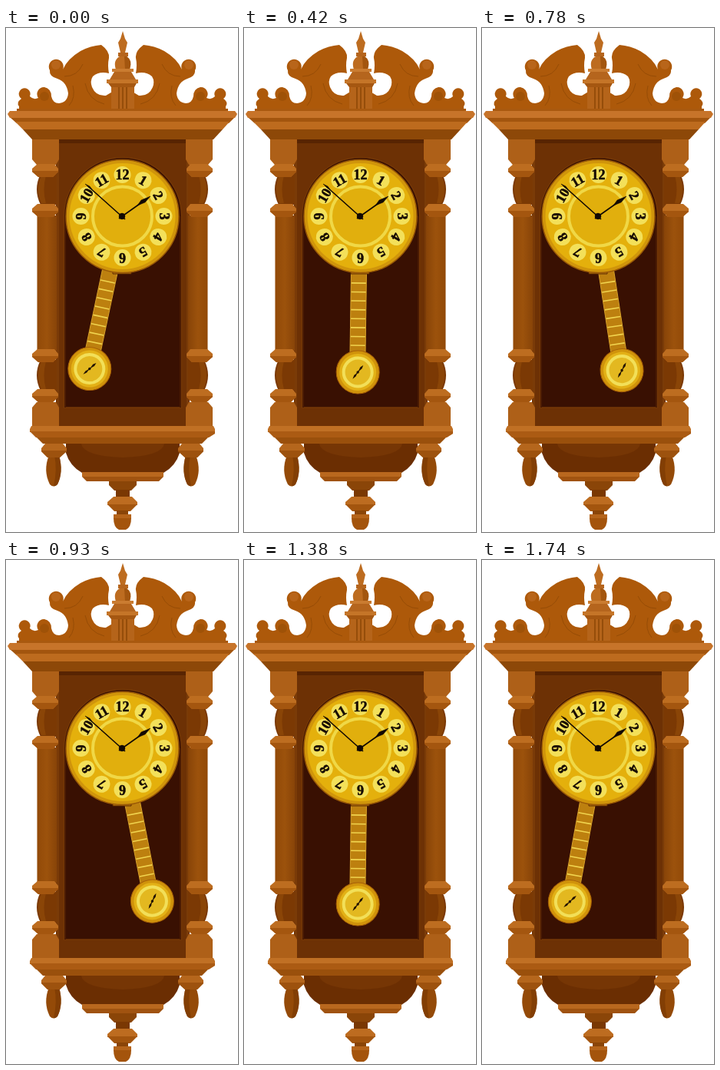
Animation, 302 px wide and 656 px high, one loop 1770 ms. Source, as an HTML page:

```html
<!DOCTYPE html>
<html lang="en">
<head>
<meta charset="utf-8">
<title>Pendulum clock</title>
<style>
  html, body { margin: 0; width: 100%; height: 100%; overflow: hidden; background: #fff; }
  svg { display: block; width: 302px; height: 656px; }
  text {
    font: bold 18px "Liberation Serif", "Noto Serif", serif;
    text-anchor: middle; fill: #160b02; stroke: #160b02; stroke-width: .5;
  }
</style>
</head>
<body>
<svg viewBox="0 0 302 656">
  <defs>
    <linearGradient id="shaft">
      <stop offset="0" stop-color="#924a08"/>
      <stop offset=".5" stop-color="#9c520c"/>
      <stop offset="1" stop-color="#884408"/>
    </linearGradient>
    <g id="collar">
      <path fill="#bd6d20" d="M41 0H63L68 6V10L61 17H42L34 10V6Z"/>
      <path fill="#a4560f" d="M34 9H68V10L61 17H42L34 10Z"/>
    </g>
    <g id="spindle">
      <path fill="#7b3904" d="M45 0H66V40H45Q35 20 45 0Z"/>
      <path fill="#8a4507" d="M46 2H52Q47 20 52 38H46Q38 20 46 2Z"/>
    </g>
    <path id="block" fill="#ae6018" d="M34 0H69V26L65 33H40L34 26Z"/>
    <g id="side">
      <!-- swan-neck scroll -->
      <path fill="#ad590a" d="M17 108V102Q13 97 20 92A7.500 7.500 0 1 1 31 89Q36 94 42 91
        A9 9 0 0 1 50 77Q59 79 59 89Q61 98 69 98Q80 97 81 85Q79 70 67 66Q56 63 57 55
        A9.500 9.500 0 1 1 74 54Q80 40 97 30Q110 23 124 22Q135 30 134 39Q132 48 134 59
        Q121 56 113 63Q109 69 112 77Q117 89 130 88L140 82V108Z"/>
      <path fill="none" stroke="#964c06" d="M76 63Q93 63 100 47M87 75Q91 91 82 101M103 72Q107 94 128 99"/>
      <circle cx="65" cy="48" r="6" fill="#b8651a"/>
      <circle cx="50" cy="89" r="6" fill="#9f5207"/>
      <!-- column -->
      <use href="#spindle" y="190"/>
      <use href="#spindle" y="432"/>
      <path fill="url(#shaft)" d="M40.500 244H66V420H40.500Z"/>
      <use href="#block" y="145"/>
      <use href="#block" transform="matrix(1 0 0 -1 0 520)"/>
      <use href="#collar" y="177"/>
      <use href="#collar" y="229"/>
      <use href="#collar" y="418"/>
      <use href="#collar" y="470"/>
      <!-- hanging drop -->
      <path fill="#944a08" d="M56 556H69Q75 578 67 594Q62 599 57 594Q48 576 56 556Z"/>
      <path fill="#823e04" d="M63 556H69Q75 578 67 594Q64 597 62 596Q67 575 63 556Z"/>
      <path fill="#b5661c" d="M51 541H74L79 547V551L70 559H54L46 551V547Z"/>
      <path fill="#9d520e" d="M46 550H79V551L70 559H54L46 551Z"/>
    </g>
  </defs>

  <!-- cabinet -->
  <path fill="#6d3105" d="M65 145H239V519H65Z"/>
  <path fill="#582402" d="M66 145H238V150H66Z"/>
  <path fill="#7a3b08" d="M66 150H69V519H66ZM235 150H238V519H235Z"/>
  <path fill="#391002" stroke="#753807" stroke-width="1.500" d="M75.500 494V245A76 76 0 0 1 228.500 245V494Z"/>
  <path fill="#4b1b03" d="M76 245H78V494H76ZM226 245H228V494H226Z"/>

  <!-- bowl -->
  <path fill="#6b2e02" d="M78 541H226V553Q221 570 205 579H99Q83 570 78 553Z"/>
  <path fill="#763605" d="M98 541H206Q204 557 152 559Q100 557 98 541Z"/>

  <use href="#side"/>
  <use href="#side" transform="matrix(-1 0 0 1 303 0)"/>

  <!-- centre finial -->
  <path fill="#bd6c20" d="M152 4L155 14L158 19L155 32H149L146 19L149 14Z"/>
  <path fill="#b5651d" d="M146 32H159V37H146Z"/>
  <path fill="#bd6c20" d="M148 37H157Q165 42 161 54H143Q139 42 148 37Z"/>
  <path fill="#a3560f" d="M154 37H157Q165 42 161 54H155Z"/>
  <path fill="#ca7c31" d="M138 53H166V57H138Z"/>
  <path fill="#b5651d" d="M141 57H163L169 67H135Z"/>
  <path fill="#c57528" d="M131 67H172V72H131Z"/>
  <path fill="#a55711" d="M133 72H170L167 77H137Z"/>
  <path fill="#b5641a" d="M137 77H167V108H137Z"/>
  <path stroke="#8b4506" stroke-width="1.500" d="M147 77V106M152 77V106M157 77V106"/>

  <!-- cornice -->
  <path fill="#a9590f" d="M14 105H289V109H14Z"/>
  <path fill="#c7742a" d="M5 108H298L301 112L298 117H5L2 112Z"/>
  <path fill="#a3550e" d="M6 117H297L290 124H14Z"/>
  <path fill="#bd6b1e" d="M12 122H291L282 132H22Z"/>
  <path fill="#8d4808" d="M22 132H282L270 145H34Z"/>

  <!-- base -->
  <path fill="#c07024" d="M33 518H270L272 522V526H31V522Z"/>
  <path fill="#ab5b13" d="M31 525H272V528L264 533H39Z"/>
  <path fill="#9a500c" d="M40 533H263L255 541H48Z"/>
  <path fill="#b9681e" d="M99 578H205V584H99Z"/>
  <path fill="#a05310" d="M99 584H205L199 590H105Z"/>
  <path fill="#8a4508" d="M134 590H170V595L163 602H141L134 595Z"/>
  <path fill="#7a3803" d="M143 601H161V612H143Z"/>
  <path fill="#bd6c20" d="M140 610H164L171 617V621H132V617Z"/>
  <path fill="#a3550e" d="M132 620H171L162 629H141Z"/>
  <path fill="#8a4508" d="M144 628H159V636H144Z"/>
  <path fill="#b5641a" d="M140 633H163V639H140Z"/>
  <path fill="#a4540c" d="M140 638H163Q163 650 156 653H147Q140 650 140 638Z"/>

  <g id="pendulum">
    <path fill="#bd800f" stroke="#d6a02a" d="M140.500 300H160.500V424H140.500Z"/>
    <path id="bars" stroke="#f0d34e" stroke-width="1.600"/>
    <circle cx="151" cy="448" r="28" fill="#d0930b" stroke="#a75f08"/>
    <circle cx="151" cy="448" r="24" fill="#e3b116"/>
    <circle cx="151" cy="448" r="18.500" fill="#e3b820" stroke="#f2df58" stroke-width="4"/>
    <g transform="rotate(37 151 448)" fill="#231303">
      <path d="M151 436.500L152.500 441L151.600 445V451L152.400 454L151 459L149.600 454L150.400 451V445L149.500 441Z"/>
      <circle cx="151" cy="448" r="1.700"/>
    </g>
  </g>

  <!-- dial -->
  <path fill="#b8780b" stroke="#5a2903" d="M139 314H163V320H139Z"/>
  <circle cx="151.500" cy="245" r="73.500" fill="#d0950b" stroke="#9a5907" stroke-width="1.500"/>
  <circle cx="151.500" cy="245" r="69" fill="#e4b00c"/>
  <circle cx="151.500" cy="245" r="38.500" fill="#e1af0d" stroke="#f0d846" stroke-width="4"/>
  <g id="hours"></g>
  <g fill="#120903" stroke="#120903">
    <path stroke-width="1.600" d="M155 249L108 207M147 248L181 224"/>
    <path stroke-width=".5" d="M103 203L109 206L112 210L108 208ZM188 219L181 227L171 231L176 224Z"/>
    <circle cx="151" cy="245" r="3.800"/>
  </g>
</svg>
<script>
  const byId = id => document.getElementById(id);

  byId("bars").setAttribute("d",
    Array.from({ length: 8 }, (_, i) => `M141 ${332 + i * 11.6}H160`).join(""));

  byId("hours").innerHTML = Array.from({ length: 12 }, (_, i) =>
    `<g transform="rotate(${(i + 1) * 30} 151.500 245)">
      <circle cx="151.500" cy="191" r="11" fill="#f3e05a"/>
      <text x="151.500" y="197">${i + 1}</text>
    </g>`).join("");

  const STEP = 30, STEPS = 59, TURN = 30;
  const pendulum = byId("pendulum");
  const start = performance.now();

  function draw(now) {
    const step = Math.floor(Math.max(0, now - start) / STEP) % STEPS;
    // Constant speed from one side to the other and back
    const angle = 12 - 0.8 * (TURN - Math.abs(step - TURN));
    pendulum.setAttribute("transform", `rotate(${angle} 151 245)`);
    requestAnimationFrame(draw);
  }
  draw(start);
</script>
</body>
</html>
```
